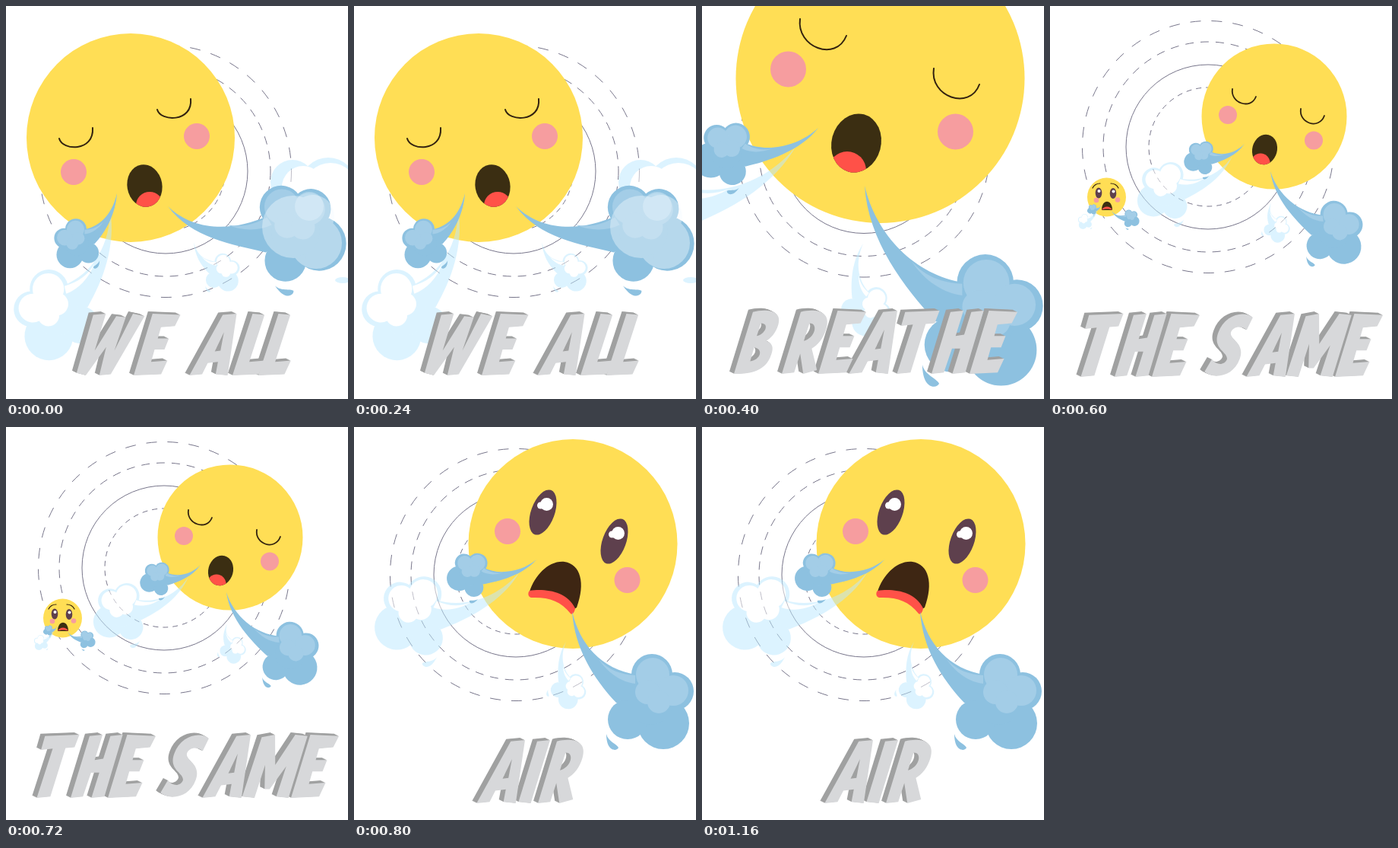
An HTML page that plays this animation: 450 by 516 pixels, repeating every 1400 ms.

```html
<!DOCTYPE html>
<html lang="en">
<head>
<meta charset="utf-8">
<title>We all breathe the same air</title>
<style>
html, body { margin: 0; width: 100%; height: 100%; overflow: hidden; background: #fff; }
svg { display: block; width: 450px; height: 516px; }
.scene { opacity: 0; }
.ring { fill: none; stroke: #77758a; stroke-width: 1; }
.lid { fill: none; stroke: #33220f; stroke-linecap: round; }
</style>
</head>
<body>
<svg id="stage" viewBox="0 0 450 516" role="img" aria-label="We all breathe the same air"></svg>
<script>
const SUN = '#ffde55', PINK = '#f69d9f', RED = '#ff5148', MOUTH = '#3b2e12', IRIS = '#5e404d';
const TONES = {
  blue: { base: '#8dc1e0', light: '#a3cde7', alpha: 1 },
  pale: { base: '#bde9ff', light: '#fff', alpha: 0.52 }
};
const LOOP = 1400;

const circle = (x, y, r, fill) => `<circle cx="${x}" cy="${y}" r="${r}" fill="${fill}"/>`;
const oval = (x, y, rx, ry, turn, fill) =>
  `<ellipse rx="${rx}" ry="${ry}" fill="${fill}" transform="translate(${x} ${y}) rotate(${turn})"/>`;
const shape = (d, fill) => `<path d="${d}" fill="${fill}" fill-rule="evenodd"/>`;
const lid = (d, w) => `<path class="lid" d="${d}" stroke-width="${w}"/>`;
const lobes = (list, fill) => list.map(([x, y, r]) => circle(x, y, r, fill)).join('');

function rings(x, y) {
  const dashes = [[78, '7 6'], [108, 'none'], [138, '11 9'], [165.5, '14 14']];
  return dashes.map(([r, dash]) =>
    `<circle class="ring" cx="${x}" cy="${y}" r="${r}" stroke-dasharray="${dash}"/>`).join('');
}

// A cloud at (x, y) with a curved tail that ends in the tip (tx, ty).
const BODY = [[2, -36, 27], [32, -14, 25], [17, 28, 34], [-30, 23, 26], [0, 0, 30]];
const SHINE = [[3, -36, 22], [30, -15, 20], [-4, -13, 16], [11, 0, 15]];

function puff(tone, x, y, s, turn, tx, ty, side = 1) {
  const { base, light, alpha } = TONES[tone];
  const a = -turn * Math.PI / 180, dx = tx - x, dy = ty - y;
  const u = (dx * Math.cos(a) - dy * Math.sin(a)) / (s * side);
  const v = (dx * Math.sin(a) + dy * Math.cos(a)) / s;
  const k = Math.hypot(u, v) / 157;
  const tail = `M${u} ${v}C${u + 10 * k} ${v + 43 * k} -65 -43 -18 -36L0 0 -45 1` +
    `C-75 -31 ${u + 3 * k} ${v + 48 * k} ${u} ${v}Z`;
  return `<g opacity="${alpha}" transform="translate(${x} ${y}) rotate(${turn}) scale(${s * side} ${s})">` +
    shape(tail, base) + lobes(BODY, base) +
    shape('M-68 -56C-55 -42 -40 -36 -20 -35V-24C-38 -26 -56 -38 -68 -56Z', light) +
    lobes(SHINE, light) +
    shape('M-58 42C-56 52 -44 55 -42 60C-44 65 -58 66 -58 42Z', base) + '</g>';
}

let clips = 0;
function roundMouth(x, y, rx, ry, turn, tx, ty, tr) {
  const id = 'mouth' + clips++;
  return `<clipPath id="${id}">${oval(x, y, rx, ry, turn, '#000')}</clipPath>` +
    oval(x, y, rx, ry, turn, MOUTH) +
    `<g clip-path="url(#${id})">${circle(tx, ty, tr, RED)}</g>`;
}

const openEye = (x, y) => oval(x, y, 15.5, 31, 20, IRIS) +
  circle(x + 5, y - 10.5, 8.5, '#fff') + circle(x - 3, y - 9, 4.5, '#fff');

// Brush capitals on a 100 unit high box.
const GLYPHS = {
  W: 'M0 2L20 0 19 60 38 4 54 6 51 60 64 0 84 4 56 98 38 100 36 54 16 100 0 96Z',
  E: 'M2 0L48 2 44 20 22 22 22 40 40 40 38 58 22 58 22 78 48 76 44 98 0 100Z',
  A: 'M24 2L46 0 60 100 40 98 38 78 22 80 18 98 -2 100ZM28 61L37 60 34 30Z',
  L: 'M4 0L24 2 21 78 46 76 42 98 0 100Z',
  B: 'M2 2C20 -3 48 -2 48 22C48 36 42 44 36 48C50 52 52 62 50 74C46 98 22 100 0 100Z' +
     'M20 20L19 40C32 38 34 20 20 20ZM20 58V80C36 78 36 60 20 58Z',
  R: 'M2 2C20 -3 50 -2 50 28C50 44 44 54 36 60L54 94 34 100 20 68 19 98 0 100Z' +
     'M21 20L20 48C36 44 36 20 21 20Z',
  T: 'M0 2L54 0 52 20 38 21 36 98 15 100 18 22 0 24Z',
  H: 'M2 2L22 0 21 40 34 38 35 2 54 0 53 98 33 100 34 60 21 60 19 98 0 100Z',
  S: 'M50 6L46 26C36 18 22 20 22 30C24 42 50 46 48 72C46 100 16 104 -2 92L4 72' +
     'C14 82 27 82 28 72C26 60 0 56 2 30C4 2 32 -6 50 6Z',
  M: 'M2 4L22 0 36 48 54 0 74 2 72 100 52 98 54 50 38 86 30 86 20 48 18 100 -2 98Z',
  I: 'M2 2L22 0 20 100 0 98Z'
};

function word(letters, xs, base, size) {
  const layer = (dx, dy, fill) => [...letters].map((c, i) =>
    `<g transform="translate(${xs[i] + dx} ${base + dy}) skewX(-16) scale(${size}) translate(0 -100)">` +
    shape(GLYPHS[c], fill) + '</g>').join('');
  let out = '';
  for (let i = 6; i > 0; i--) out += layer(-i, -i / 2, '#a0a1a1');
  return out + layer(0, 0, '#d7d8da');
}

function smallFace() {
  return circle(74.5, 251, 25.5, SUN) +
    oval(64, 245.5, 4.3, 7, 0, IRIS) + oval(83, 246, 4.3, 7, 0, IRIS) +
    circle(64.5, 243, 2, '#fff') + circle(83.5, 243.5, 2, '#fff') +
    lid('M56 239Q59 233 66 233', 1.2) + lid('M80 233Q87 233 90 239', 1.2) +
    circle(61, 255, 3.3, PINK) + circle(89, 254.5, 3.3, PINK) +
    shape('M68 268C68 253 82 253 82 268Z', MOUTH) +
    shape('M68 268C70 262 80 262 82 268C79 266 71 266 68 268Z', RED) +
    puff('pale', 46, 283, 0.16, 0, 63, 265, -1) +
    puff('blue', 56, 267, 0.11, 30, 68, 261, -1) +
    puff('blue', 106, 279, 0.19, -25, 81, 269);
}

function weAll() {
  return rings(210, 217) + circle(164, 173, 137, SUN) +
    lid('M70 174C74 190 116 192 114 160', 2) + lid('M199 136C203 152 246 153 243 122', 2) +
    circle(89, 218, 17, PINK) + circle(251, 171, 17, PINK) +
    roundMouth(182.5, 236, 23, 28, -10, 189, 262, 18) +
    puff('pale', 66, 404, 0.94, -13, 137, 268, -1) +
    puff('blue', 93, 312, 0.52, 0, 146, 246, -1) +
    puff('pale', 285, 350, 0.4, -2, 247, 310) +
    `<g opacity=".52">${lobes([[377, 231, 29], [424, 236, 37]], '#bde9ff')}` +
    `${lobes([[391, 238, 28], [427, 242, 36]], '#fff')}${oval(443, 360, 10, 4, 0, '#bde9ff')}</g>` +
    puff('blue', 381, 297, 1.05, -33, 213, 263) +
    `<g opacity=".4">${lobes([[378, 290, 41], [408, 311, 34], [404, 276, 28]], '#f4fbff')}</g>` +
    `<g opacity=".35">${circle(399, 263, 19, '#eaf6fc')}</g>` +
    word('WEALL', [92, 168, 243, 298, 332], 485, 0.81);
}

function breathe() {
  return rings(213, 190.5) + circle(234.5, 95, 190, SUN) +
    lid('M129 17C124 54 176 74 190 39', 2) + lid('M305 82C299 119 352 138 365 103', 2) +
    circle(113.5, 83, 23.5, PINK) + circle(333.5, 165, 23.5, PINK) +
    roundMouth(203, 180, 32.5, 39, 15, 191, 216, 25) +
    puff('pale', -67, 265, 1.19, 26, 123, 185, -1) +
    puff('blue', 32, 193, 0.68, 34, 153, 160, -1) +
    puff('pale', 217, 398, 0.53, 37, 212, 312) +
    puff('blue', 370, 413, 1.38, 0, 214, 236) +
    word('BREATHE', [42, 105, 153, 195, 244, 302, 352], 483, 0.83);
}

function theSame() {
  return rings(208, 185) + circle(295, 145, 95.5, SUN) +
    lid('M240 109C237 127 264 137 271 119', 1.8) + lid('M330 135C327 154 354 163 361 144', 1.8) +
    circle(234, 143, 12, PINK) + circle(347, 176.5, 12, PINK) +
    roundMouth(282.5, 188.5, 16.3, 20, 15, 277, 206, 12.5) +
    puff('pale', 152, 243, 0.62, 21, 240, 197, -1) +
    puff('blue', 199, 199, 0.36, 31, 256, 181, -1) +
    puff('pale', 299, 292, 0.28, 27, 291, 258) +
    puff('blue', 374, 298, 0.67, -4, 290, 217) +
    smallFace() +
    word('THESAME', [28, 85, 134, 203, 260, 312, 375], 487, 0.83);
}

function air() {
  return rings(213, 194) + circle(288, 153.5, 137.5, SUN) +
    openEye(248.5, 112) + openEye(342.5, 150) +
    circle(202, 137, 17, PINK) + circle(359.5, 201, 17, PINK) +
    shape('M231 216C238 195 256 175 277 177C298 180 305 205 293 237L288 240C275 225 255 220 231 216Z', '#3e2613') +
    shape('M231 215C250 212 280 215 291 238C290 244 287 247 285 245C272 228 255 223 233 224C228 223 229 216 231 215Z', RED) +
    puff('pale', 80, 248, 0.86, 26, 218, 190, -1) +
    puff('blue', 153, 193, 0.48, 37, 240, 174, -1) +
    puff('pale', 283, 345, 0.38, 37, 279, 282) +
    puff('blue', 390, 361, 1, 0, 287, 242) +
    word('AIR', [163, 216, 242], 494, 0.83);
}

const SCENES = [[weAll, 0, 400], [breathe, 400, 600], [theSame, 600, 800], [air, 800, LOOP]];
const stage = document.getElementById('stage');
stage.innerHTML = SCENES.map(([draw]) => `<g class="scene">${draw()}</g>`).join('');

// Hard cuts: each scene is opaque only between its start and end.
stage.querySelectorAll('.scene').forEach((scene, i) => {
  const [, start, end] = SCENES[i];
  const steps = [[0, 0], [1, start], [0, end], [0, LOOP]];
  const run = scene.animate(
    steps.map(([opacity, time]) => ({ opacity, offset: time / LOOP, easing: 'step-end' })),
    { duration: LOOP, iterations: Infinity });
  run.startTime = 0;
});
</script>
</body>
</html>
```
